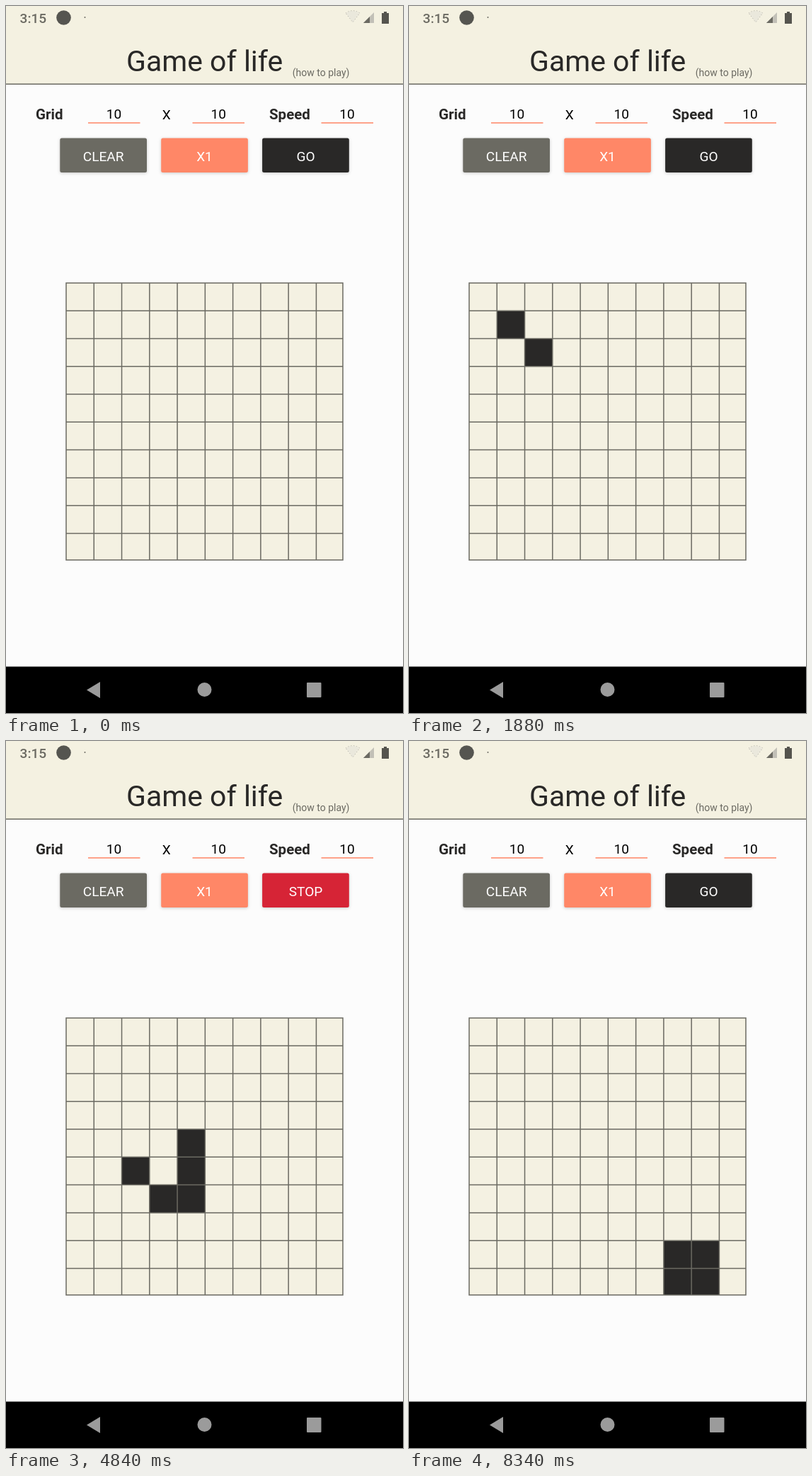
These frames come from a looping animation (561x998 px, 8.39 s). An HTML page:

```html
<!DOCTYPE html>
<html lang="en">
<head>
<meta charset="utf-8">
<title>Game of life</title>
<style>
  html, body { margin: 0; width: 100%; height: 100%; overflow: hidden; background: #fcfcfc; }
  svg { display: block; width: 561px; height: 998px; font: 19.1px Roboto, sans-serif; fill: #292827; }
  .mid { text-anchor: middle; fill: #000; }
  .bold { font-weight: 700; font-size: 20.5px; }
  .button { filter: drop-shadow(0 1px 2px #0003); }
  .label { fill: #fff; text-anchor: middle; }
  .field { stroke: #ff8565; stroke-width: 1.6; }
  .line { stroke: #6b6a62; stroke-width: 1.5; fill: none; }
  .grey { fill: #6b6a62; }
</style>
</head>
<body>
<svg viewBox="0 0 561 998">
  <rect width="561" height="110" fill="#f4f1e1"/>
  <path class="line" d="M0 110.3H561"/>

  <!-- status bar -->
  <text class="grey" x="19.600" y="23.500" font-weight="500">3:15</text>
  <circle cx="81.500" cy="16.500" r="10.300" fill="#555550"/>
  <circle class="grey" cx="111.500" cy="16" r="1"/>
  <path d="M480 10Q490 3 500 10L490 23Z" fill="#eae8dc" stroke="#aaa89e" stroke-dasharray="1 3"/>
  <path d="M520 9V24H505Z" fill="#c2c0b7"/>
  <path class="grey" d="M514 15V24H505Z"/>
  <path d="M534 8h4v2h3v15h-10v-15h3z" fill="#55544e"/>

  <text x="170" y="92" font-size="41">Game of life</text>
  <text class="grey" x="404.800" y="99" font-size="14">(how to play)</text>

  <text class="bold" x="42" y="160">Grid</text>
  <text class="bold" x="372" y="160">Speed</text>
  <g class="mid">
    <text x="226.700" y="160">X</text>
    <text x="152.500" y="158.600">10</text>
    <text x="300.300" y="158.600">10</text>
    <text x="482" y="158.600">10</text>
  </g>
  <path class="field" d="M116 165H189.500M263.500 165H337M445.500 165H519"/>

  <g class="button">
    <rect x="76.300" y="186.500" width="122.700" height="48.500" rx="2.500" fill="#6b6a62"/>
    <rect x="219.200" y="186.500" width="122.700" height="48.500" rx="2.500" fill="#ff8767"/>
    <rect id="go" x="362.100" y="186.500" width="122.700" height="48.500" rx="2.500"/>
  </g>
  <text class="label" x="137.700" y="218.500">CLEAR</text>
  <text class="label" x="280.500" y="218.500">X1</text>
  <text class="label" id="goText" x="423.500" y="218.500">GO</text>

  <rect x="85" y="391" width="391" height="391" fill="#f4f1e2"/>
  <path id="alive"/>
  <path id="lines" class="line"/>

  <!-- navigation bar -->
  <rect y="932.500" width="561" height="66" fill="#000"/>
  <g fill="#9b9b9b">
    <path d="M114 965.500L133 954V977Z"/>
    <circle cx="280.500" cy="965" r="10"/>
    <rect x="425" y="955" width="20.500" height="21" rx="1"/>
  </g>
</svg>
<script>
  const LOOP = 8390, N = 10, PITCH = 39.27, SIZE = 391, LEFT = 85, TOP = 391;
  const GO = 3640, STEP = 105, FIRST = 3735, STOP = 7300;
  // taps: time, row, column
  const taps = [[1440, 1, 1], [1820, 2, 2], [2200, 3, 2], [2580, 3, 1], [2950, 3, 0]];
  const el = id => document.getElementById(id);
  const pos = k => Math.min(k * PITCH, SIZE);

  let grid = '';
  for (let k = 0; k <= N; k++) {
    grid += `M${LEFT + pos(k)} ${TOP - 0.7}v${SIZE + 1.4}M${LEFT - 0.7} ${TOP + pos(k)}h${SIZE + 1.4}`;
  }
  el('lines').setAttribute('d', grid);

  function next(cells) {
    const has = (r, c) => cells.some(([y, x]) => y === r && x === c);
    const out = [];
    for (let r = 0; r < N; r++) for (let c = 0; c < N; c++) {
      const near = cells.filter(([y, x]) => Math.max(Math.abs(y - r), Math.abs(x - c)) === 1).length;
      if (near === 3 || near === 2 && has(r, c)) out.push([r, c]);
    }
    return out;
  }

  const generations = [taps.map(([, r, c]) => [r, c])];
  while (generations.length < 30) generations.push(next(generations.at(-1)));

  function cellsAt(t) {
    if (t < GO) return taps.filter(tap => tap[0] <= t).map(([, r, c]) => [r, c]);
    const n = Math.floor((t - FIRST) / STEP);
    return generations[Math.max(0, Math.min(n, generations.length - 1))];
  }

  function draw(now) {
    const t = now % LOOP, running = t >= GO && t < STOP;
    el('alive').setAttribute('d', cellsAt(t).map(([r, c]) =>
      `M${LEFT + pos(c)} ${TOP + pos(r)}H${LEFT + pos(c + 1)}V${TOP + pos(r + 1)}H${LEFT + pos(c)}Z`).join(''));
    el('go').setAttribute('fill', running ? '#d62436' : '#292827');
    el('goText').textContent = running ? 'STOP' : 'GO';
  }

  const start = performance.now();
  function frame() {
    draw(performance.now() - start);
    requestAnimationFrame(frame);
  }
  frame();
</script>
</body>
</html>
```
